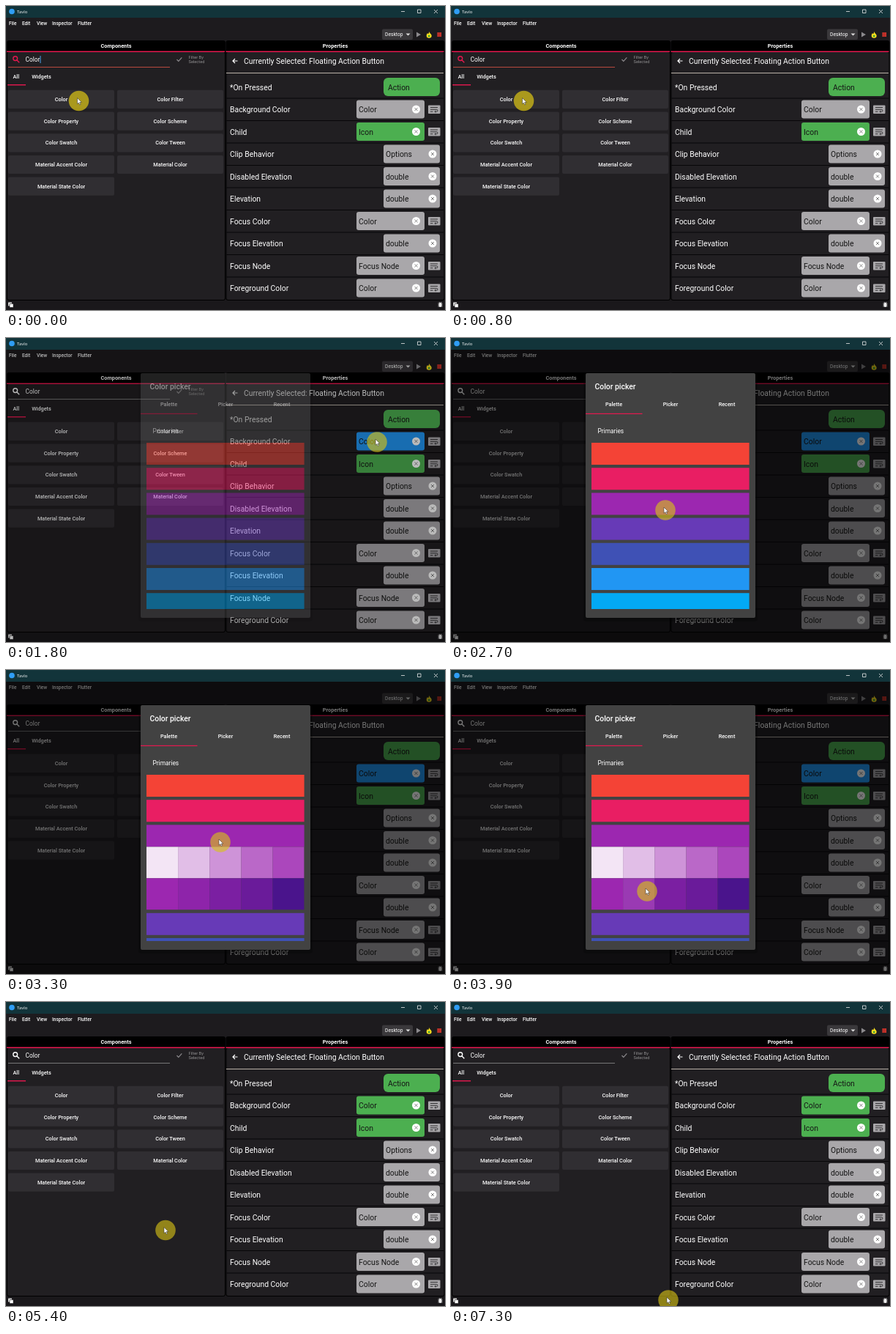
Animation, 600 px wide and 415 px high, one loop 7400 ms. Source, as an HTML page:

```html
<!DOCTYPE html>
<html lang="en">
<head>
<meta charset="utf-8">
<style>
html, body { margin: 0; width: 100%; height: 100%; overflow: hidden; background: #000; }
svg { display: block; width: 600px; height: 415px; font-family: Roboto, "Open Sans", sans-serif; }
</style>
</head>
<body>
<svg id="stage" viewBox="0 0 600 415"></svg>
<script>
const LOOP = 7400, STEP = 100;
const OPEN_DIALOG = 1700, OPEN_TILE = 3100, CLOSE_DIALOG = 5400;
const GREEN = '#4caf50', BLUE = '#2196f3', GREY = '#a9a7aa', RED = '#e5184f';

const rect = (x, y, w, h, fill, r = 0, extra = '') =>
  `<rect x="${x}" y="${y}" width="${w}" height="${h}" rx="${r}" fill="${fill}" ${extra}/>`;
const text = (x, y, s, size, extra = '') =>
  `<text x="${x}" y="${y}" font-size="${size}" fill="#fff" ${extra}>${s}</text>`;
const label = (x, y, s, size = 7.3, weight = 500) =>
  text(x, y, s, size, `text-anchor="middle" font-weight="${weight}"`);
const line = (d, color, w = 1, extra = '') =>
  `<path d="${d}" fill="none" stroke="${color}" stroke-width="${w}" ${extra}/>`;

function titleBar() {
  return rect(0, 0, 600, 16, '#12343a') +
    '<circle cx="8" cy="7.5" r="3.8" fill="#2f9df4"/>' +
    text(15, 10, 'Tavlo', 6, 'font-family="Open Sans, sans-serif"') +
    line('M540 7.5h5M562.5 5h4.5v4.5h-4.5zM585 5l5 5M590 5l-5 5', '#e8e8e8', .8);
}

function menuBar() {
  const items = [[4, 'File'], [22, 'Edit'], [42, 'View'], [63, 'Inspector'], [98, 'Flutter']];
  return items.map(([x, s]) => text(x, 25.5, s, 6.5, 'font-weight="500"')).join('') +
    rect(514, 31.5, 42, 14.5, '#3a383b', 2) + text(518, 41, 'Desktop', 6.7) +
    '<path d="M546.5 37.5h6l-3 3z" fill="#ddd"/>' +
    '<path d="M561 35.5l6 3.5-6 3.5z" fill="#8b898c"/>' +
    '<path d="M578.5 34.5c0 3 3.2 3.5 3.2 6a3.5 3.2 0 0 1-7 0c0-2 1-2.500 1.200-3.500l1.200 1.200c.8-1 1.200-2.200 1.400-3.700z" fill="#f5dc1e"/>' +
    '<circle cx="578.2" cy="41" r="1.300" fill="#2a9a3c"/>' +
    rect(589.5, 36, 5.5, 6, '#d8392f') + line('M591.300 36v6M593.200 36v6', '#7d1a1a', .6);
}

function panel(x, title) {
  return rect(x, 47, 299, 355, '#000', 3) + rect(x + 1, 63, 297, 338, '#211f22', 2) +
    label(x + 149.5, 57, title, 7.3, 700) + rect(x, 61.5, 298, 1.5, RED);
}

function components() {
  const names = ['Color', 'Color Filter', 'Color Property', 'Color Scheme', 'Color Swatch',
    'Color Tween', 'Material Accent Color', 'Material Color', 'Material State Color'];
  return panel(1, 'Components') +
    '<g id="search" fill="none" stroke-width="1.400"><circle cx="12.700" cy="71.600" r="2.900"/><path d="M14.800 73.800l3.400 3.400"/></g>' +
    text(26.5, 75.8, 'Color', 8.4) + rect(46.500, 68, 1, 10, '#4aa3ee', 0, 'id="caret"') +
    rect(3, 83, 221, 1, '#777', 0, 'id="underline"') +
    line('M233.500 73l2.300 2.400 4.500-5', '#8d8b8e', 1.200) +
    ['Filter By', 'Selected'].map((s, i) =>
      `<g opacity=".5">${text(249.5, 72 + i * 6.4, s, 5.7)}</g>`).join('') +
    label(13.8, 98.5, 'All') + label(48.5, 98.5, 'Widgets') + rect(2, 107, 25, 1.4, RED) +
    names.map((s, i) => {
      const x = i % 2 ? 152 : 3, y = 114.8 + (i >> 1) * 29.7;
      return rect(x, y, 145, 25.2, '#302e32', 2) + label(x + 72.5, y + 15.2, s);
    }).join('');
}

function chip(y, value, wide, fill, id = '') {
  const x = wide ? 479 : 516, w = wide ? 93 : 77, action = value === 'Action';
  const cx = x + w - (wide ? 11.5 : 10);
  let out = rect(x, y - 12.5, w, 25, fill, action ? 6 : 3, id && `id="${id}"`) +
    `<text x="${x + (action ? 6 : 3)}" y="${y + 4}" font-size="10.400" fill="#151515">${value}</text>`;
  if (!action) out += `<circle cx="${cx}" cy="${y}" r="5.500" fill="#fff"/>` +
    line(`M${cx - 2} ${y - 2}l4 4m0-4l-4 4`, '#777', .9);
  if (wide) out += rect(577, y - 5.5, 16.5, 11.5, GREY, 1) +
    line(`M580 ${y - 2.500}h10M580 ${y + .3}h8.500a1.400 1.400 0 0 1 0 2.900h-2.500M580 ${y + 3.200}h3.500M587.300 ${y + 1.900}l-1.400 1.300 1.400 1.300`, '#29272a', .9);
  return out;
}

function properties() {
  const rows = [['*On Pressed', 'Action', false, GREEN], ['Background Color', 'Color', true, GREY, 'target'],
    ['Child', 'Icon', true, GREEN], ['Clip Behavior', 'Options'], ['Disabled Elevation', 'double'],
    ['Elevation', 'double'], ['Focus Color', 'Color', true], ['Focus Elevation', 'double'],
    ['Focus Node', 'Focus Node', true], ['Foreground Color', 'Color', true]];
  return panel(300.5, 'Properties') +
    line('M316.500 75h-6M313 72l-3 3 3 3', '#fff', 1.200) +
    text(325, 79, 'Currently Selected: Floating Action Button', 10.4) +
    rect(301, 91, 297, 1, '#b9b1a8') +
    rows.map(([name, value, wide, fill = GREY, id], i) => {
      const y = 110.5 + i * 30.5;
      return text(306, y + 4, name, 10.4) + chip(y, value, wide, fill, id) +
        (i < 9 ? rect(301, y + 15, 297, 1, '#070608') : '');
    }).join('');
}

function statusBar() {
  return rect(0, 402, 600, 13, '#1a181b') +
    rect(3, 404.5, 5, 5, '#ddd', .5) + rect(5, 406.5, 5, 5, '#fff', .5, 'stroke="#1a181b" stroke-width=".6"') +
    '<ellipse cx="593.500" cy="408" rx="2" ry="2.900" fill="#eee"/>' +
    line('M590.500 406h6M590.500 408h6M590.500 410h6M592 404l1 1.500M595 404l-1 1.500', '#eee', .7);
}

const TILE_X = 192, TILE_W = 215.6, TILE_Y = 143, TILE_STEP = 34.2;
const CELL_W = TILE_W / 5, CELL_H = 43.1, SHADES_Y = 241.2;

function dialog() {
  const primaries = ['#f44336', '#e91e63', '#9c27b0', '#673ab7', '#3f51b5', '#2196f3', '#03a9f4'];
  const shades = ['#f3e5f5', '#e1bee7', '#ce93d8', '#ba68c8', '#ab47bc',
    '#9c27b0', '#8e24aa', '#7b1fa2', '#6a1b9a', '#4a148c'];
  const tile = (c, i) => rect(TILE_X, TILE_Y + i * TILE_STEP, TILE_W, 30, c);
  const cells = shades.map((c, i) =>
    rect(TILE_X + i % 5 * CELL_W, SHADES_Y + (i / 5 | 0) * CELL_H, CELL_W + .1, CELL_H, c)).join('');
  return rect(181, 47, 238, 340, '#000', 4, 'opacity=".25"') + rect(184, 48, 232, 334, '#424242', 2) +
    text(196.500, 70.3, 'Color picker', 10.4, 'font-weight="500"') +
    label(222.5, 93.3, 'Palette') + label(300, 93.3, 'Picker') + label(377, 93.3, 'Recent') +
    rect(184, 102.800, 77.500, 1.200, RED) + text(200.5, 129.700, 'Primaries', 8.4) +
    `<g clip-path="url(#list)">${primaries.slice(0, 3).map(tile).join('')}
      <g clip-path="url(#shades)">${cells}${rect(0, 0, CELL_W, CELL_H, '#fff', 0, 'id="hover" opacity=".1"')}</g>
      <g id="below">${primaries.slice(3).map((c, i) => tile(c, i + 3)).join('')}</g></g>`;
}

const stage = document.getElementById('stage');
stage.innerHTML = `<defs>
  <clipPath id="list">${rect(184, 140, 232, 230, '#000')}</clipPath>
  <clipPath id="shades">${rect(TILE_X, SHADES_Y, TILE_W, 0, '#000', 0, 'id="reveal"')}</clipPath></defs>` +
  rect(0, 0, 600, 415, '#1d1b1e') + titleBar() + menuBar() + components() + properties() + statusBar() +
  `<g id="modal">${rect(0, 16, 600, 399, '#000', 0, 'opacity=".54"')}${dialog()}</g>
  <g id="cursor"><circle id="halo" r="13.800" fill="#d9c415"/>
    <path d="M-2-4v8.200l1.900-1.700 1.300 2.900 1.300-.6-1.300-2.800h2.600z" fill="#fff" stroke="#222" stroke-width=".5"/></g>`;

const path = [[0, 99.5, 129.5], [800, 99.5, 129.5], [1500, 507, 142], [1900, 507, 142],
  [2500, 293, 235], [3300, 293, 235], [3900, 268, 302], [4600, 218, 311.5],
  [7000, 218, 311.5], [7100, 226, 322], [7200, 250, 355], [7300, 297, 407], [7400, 297, 407]];

const ramp = (t, start, length) => {
  const u = Math.min(1, Math.max(0, (t - start) / length));
  return u * u * (3 - 2 * u);
};

function cursorAt(t) {
  const i = path.findIndex(p => p[0] > t);
  const [t0, x0, y0] = path[i - 1], [t1, x1, y1] = path[i];
  const u = ramp(t, t0, t1 - t0);
  return [x0 + (x1 - x0) * u, y0 + (y1 - y0) * u];
}

const set = (id, attrs) => {
  const el = document.getElementById(id);
  for (const key in attrs) el.setAttribute(key, attrs[key]);
};

function draw(t) {
  const [x, y] = cursorAt(t);
  const focused = t <= OPEN_DIALOG, modal = t < CLOSE_DIALOG ? ramp(t, OPEN_DIALOG, 200) : 0;
  set('cursor', { transform: `translate(${x} ${y})` });
  set('halo', { opacity: focused ? .72 : .62 });
  set('search', { stroke: focused ? RED : '#fff' });
  set('underline', { fill: focused ? '#b8493f' : '#777' });
  set('caret', { opacity: focused && t % 1000 < 500 ? 1 : 0 });
  const over = x >= 479 || t > OPEN_DIALOG;
  set('target', { fill: t >= CLOSE_DIALOG ? GREEN : over ? BLUE : GREY });
  set('modal', { opacity: modal });

  const opened = ramp(t, OPEN_TILE, 200) * CELL_H * 2;
  set('reveal', { height: opened });
  set('below', { transform: `translate(0 ${opened})` });
  const col = Math.floor((x - TILE_X) / CELL_W), row = Math.floor((y - SHADES_Y) / CELL_H);
  set('hover', { x: TILE_X + col * CELL_W, y: SHADES_Y + row * CELL_H });
}

function tick(now) {
  draw(Math.floor(now % LOOP / STEP) * STEP);
  requestAnimationFrame(tick);
}
draw(0);
requestAnimationFrame(tick);
</script>
</body>
</html>
```
